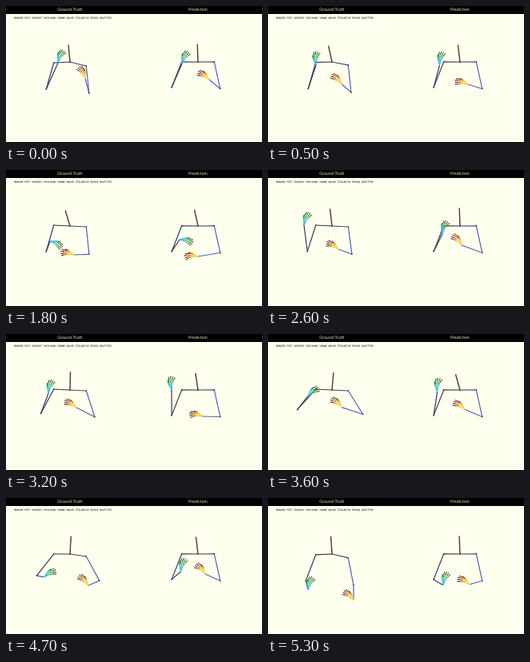
These frames come from a looping animation (320 px wide and 170 px high, 5.4 s). An HTML page with a canvas:

```html
<!DOCTYPE html>
<html lang="de">
<head>
<meta charset="utf-8">
<style>
  html, body { margin: 0; width: 100%; height: 100%; overflow: hidden; background: #fffff0; }
  canvas { display: block; }
</style>
</head>
<body>
<canvas id="stage" width="320" height="170"></canvas>
<script>
const ctx = document.getElementById('stage').getContext('2d');
const LOOP = 5400, STEP = 100, UPPER_ARM = 34.5, HAND = 17;
const keyTimes = [0, 1000, 1800, 2600, 3200, 4100, 5300];
const rad = degrees => degrees * Math.PI / 180;
const wave = (time, period = LOOP) => 2 * Math.PI * time / period;
const armsOut = time => Math.exp(-(((time - 4100) / 850) ** 2));
const droop = time => ((1 + Math.cos(wave(time))) / 2) ** 4;

// Hand keys: wrist x, wrist y, heading in degrees clockwise from straight up.
const truth = {
  neckX: 80,
  lean: time => -2 - 4.5 * Math.sin(wave(time)),
  shoulderY: (time, side) => 70 + side + (3 + side) * droop(time),
  swing: (time, side) => 11 - 5 * side + 37 * armsOut(time),
  left: [[65, 71, 17], [55, 77, -23], [55, 89, 110], [45, 69, 16],
    [53, 74, 10], [45, 83, 97], [50, 115, 13]],
  right: [[99, 91, -21], [85, 104, -63], [85, 106, -73], [88, 99, -54],
    [88, 92, -55], [98, 91, -31], [107, 128, -41]]
};
const prediction = {
  neckX: 240,
  lean: time => -3.5 + 2.7 * Math.cos(wave(time, 2600)),
  shoulderY: () => 69.8,
  swing: (time, side) => 17 - 4.5 * side,
  left: [[220, 72, 20], [209, 76, -9], [217, 87, 97], [218, 80, 12],
    [207, 70, -6], [218, 75, 9], [219, 109, 12]],
  right: [[254, 92, -50], [246, 104, -90], [240, 108, -84], [242, 94, -37],
    [246, 103, -74], [246, 82, -20], [252, 108, -56]]
};
const leftColors = ['#43b5ee', '#35b8a0', '#38a838', '#176a20'];
const rightColors = ['#ffd22e', '#f0a51c', '#b4571c', '#6b1b14'];

function poseAt(track, time) {
  let i = 0;
  while (i < keyTimes.length - 2 && time >= keyTimes[i + 1]) i++;
  const u = (time - keyTimes[i]) / (keyTimes[i + 1] - keyTimes[i]);
  const eased = u * u * (3 - 2 * u);
  return track[i].map((v, k) => v + (track[i + 1][k] - v) * eased);
}

function line(x1, y1, x2, y2, color, width = 1.2) {
  ctx.strokeStyle = color;
  ctx.lineWidth = width;
  ctx.beginPath();
  ctx.moveTo(x1, y1);
  ctx.lineTo(x2, y2);
  ctx.stroke();
}

function dot(x, y, color, size = 1.4) {
  ctx.fillStyle = color;
  ctx.fillRect(x - size / 2, y - size / 2, size, size);
}

// Five fingers fan out from the wrist and bend away from the body.
function drawHand(wx, wy, heading, side, colors) {
  for (let finger = -2; finger <= 2; finger++) {
    const length = HAND * (finger === 2 * side ? .75 : 1 - .04 * Math.abs(finger));
    let x = wx, y = wy;
    [.42, .24, .18, .16].forEach((part, i) => {
      const angle = rad(heading + finger * 9 + side * (6 - 8 * i));
      const nx = x + Math.sin(angle) * length * part;
      const ny = y - Math.cos(angle) * length * part;
      line(x, y, nx, ny, colors[i], .9);
      if (i) dot(nx, ny, i > 1 ? '#2a2416' : colors[2], 1.1);
      [x, y] = [nx, ny];
    });
  }
}

function drawArm(person, time, side) {
  const sx = person.neckX + 20.3 * side;
  const sy = person.shoulderY(time, side);
  const swing = rad(person.swing(time, side));
  const ex = sx + side * UPPER_ARM * Math.sin(swing);
  const ey = sy + UPPER_ARM * Math.cos(swing);
  const isLeft = side < 0;
  const [wx, wy, heading] = poseAt(isLeft ? person.left : person.right, time);
  const color = isLeft ? '#363a58' : '#5660ac';
  line(person.neckX, 70, sx, sy, isLeft ? '#34343f' : '#45456f');
  line(sx, sy, ex, ey, color);
  line(ex, ey, wx, wy, color);
  dot(sx, sy, '#2c2c50');
  dot(ex, ey, '#2c2c50');
  drawHand(wx, wy, heading, side, isLeft ? leftColors : rightColors);
}

function drawPerson(person, time) {
  const lean = person.lean(time);
  line(person.neckX + lean, 47 + .6 * Math.abs(lean), person.neckX, 70, '#4c3a32', 1.4);
  drawArm(person, time, -1);
  drawArm(person, time, 1);
  dot(person.neckX, 70, '#2c2c50');
}

function label(text, x, y, font, color, align) {
  ctx.font = font;
  ctx.fillStyle = color;
  ctx.textAlign = align;
  ctx.fillText(text, x, y);
}

function draw(now) {
  const time = Math.floor(now % LOOP / STEP) * STEP;
  ctx.fillStyle = '#fffff0';
  ctx.fillRect(0, 0, 320, 170);
  ctx.fillStyle = '#000';
  ctx.fillRect(0, 0, 320, 10);
  const title = '4.8px "DejaVu Sans", sans-serif';
  label('Ground Truth', 80, 5.8, title, '#fbf3bc', 'center');
  label('Prediction', 240, 5.8, title, '#fbf3bc', 'center');
  label('MORGEN FEST SUEDOST MISCHUNG SONNE WOLKE TEILWEISE REGEN GEWITTER',
    10, 16.3, '3.12px "DejaVu Sans Mono", monospace', '#000', 'left');
  drawPerson(truth, time);
  drawPerson(prediction, time);
}

const start = performance.now();
function tick() {
  draw(performance.now() - start);
  requestAnimationFrame(tick);
}
tick();
</script>
</body>
</html>
```
